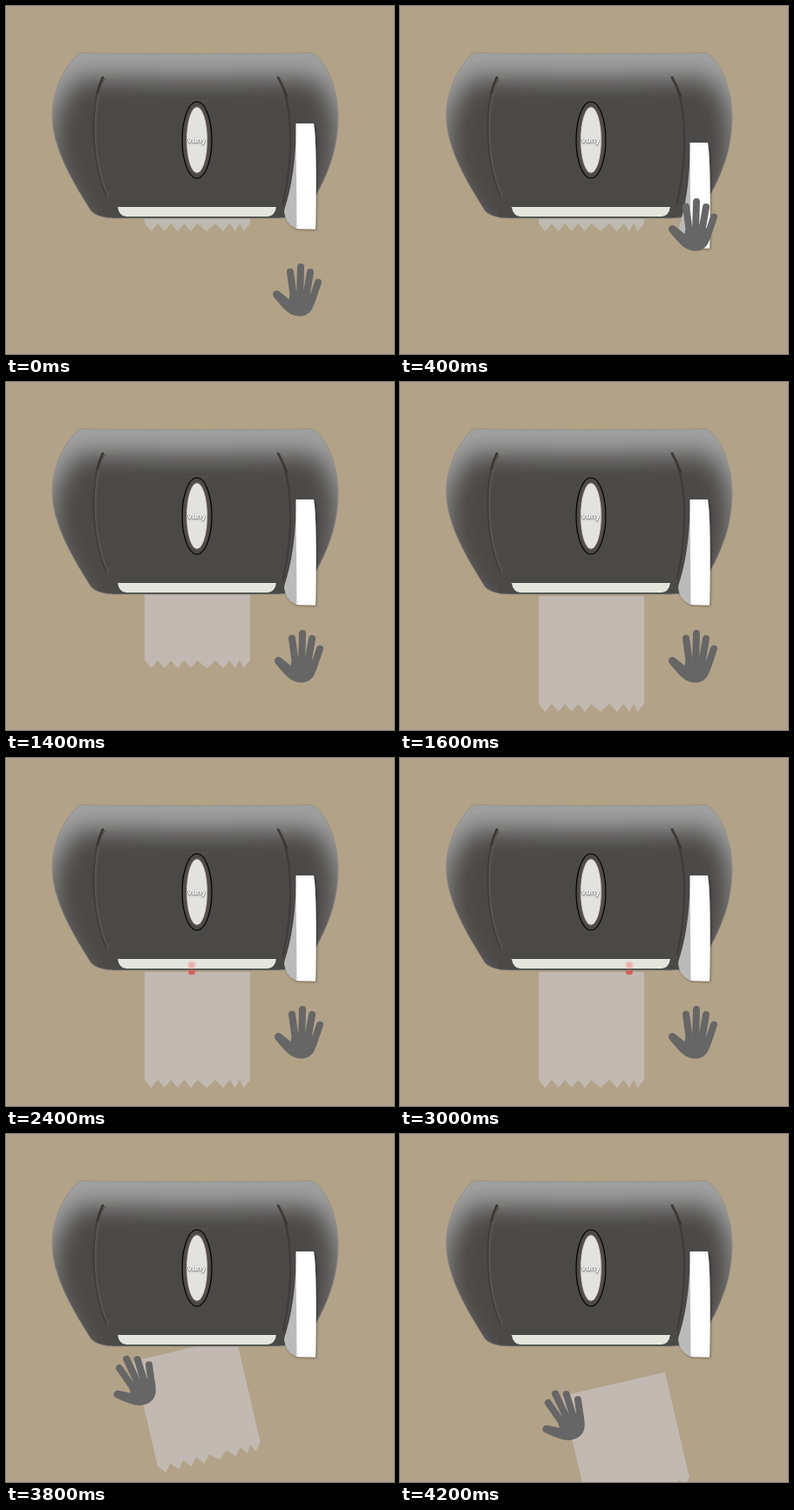
An HTML page for the animation above (4400 ms loop, 445x400 px).

```html
<!DOCTYPE html>
<html>
<head>
<meta charset="utf-8">
<style>
html, body { margin: 0; width: 100%; height: 100%; overflow: hidden; background: #b2a287; }
svg { display: block; }
text { font: bold 9px "Liberation Sans", Arial, sans-serif; }
</style>
</head>
<body>
<svg width="445" height="400" viewBox="0 0 445 400">
  <defs>
    <path id="shell" d="M84 54 Q217 56 350 54 Q355 55 359 60 C372 74 381 100 381 128 C381 165 369 198 345 235 Q335 243 311 244 H123 Q103 243 97 235 C78 204 53 165 53 126 C53 98 66 70 84 54Z"/>
    <clipPath id="inside"><use href="#shell"/></clipPath>
    <filter id="glow" x="-30%" y="-30%" width="160%" height="160%"><feGaussianBlur stdDeviation="14"/></filter>
    <filter id="blur" x="-50%" y="-50%" width="200%" height="200%"><feGaussianBlur stdDeviation="1.3"/></filter>
    <filter id="soft" x="-10%" y="-30%" width="120%" height="160%"><feGaussianBlur stdDeviation=".6"/></filter>
    <filter id="drop" x="-20%" y="-20%" width="150%" height="150%">
      <feDropShadow dx="1" dy="1" stdDeviation="1.5" flood-opacity=".4"/>
    </filter>
  </defs>

  <path id="paper"/>

  <g id="dispenser">
    <path d="M110 243.5 H325" stroke="#4c4a47" stroke-width="3" filter="url(#blur)"/>
    <g clip-path="url(#inside)">
      <use href="#shell" fill="#a2a2a2"/>
      <use href="#shell" y="28" fill="#4b4946" filter="url(#glow)"/>
      <rect x="112" y="215" width="210" height="30" fill="#4b4946"/>
    </g>
    <use href="#shell" fill="none" stroke="#8f8d8a" stroke-width=".8"/>
    <g fill="none" stroke-linecap="round" filter="url(#soft)">
      <path d="M113 84 C100 106 97 172 117 219" stroke="#595754" stroke-width="2"/>
      <path d="M111 82 C98 106 95 172 115 218" stroke="#403e3b" stroke-width="2"/>
      <path d="M111 82 Q107 90 105 100M312 82 Q318 92 322 104" stroke="#393734" stroke-width="2.6"/>
      <path d="M312 82 C328 110 331 165 318 226" stroke="#403a3b" stroke-width="2.2"/>
    </g>
    <ellipse cx="219" cy="154" rx="17" ry="44" fill="#4b4946" stroke="#000" stroke-width="1.2"/>
    <ellipse cx="219" cy="154" rx="13" ry="39" fill="#6b5855" filter="url(#blur)"/>
    <ellipse cx="219" cy="154" rx="11.8" ry="37.8" fill="#e2e2e0" filter="url(#soft)"/>
    <text x="218.5" y="157" text-anchor="middle" fill="#fff" style="text-shadow: 0 1px 2px #444">Vuny</text>
    <path d="M128 231 H310 Q308 242 300 242 H138 Q130 242 128 231Z" fill="#e4e5de" filter="url(#soft)"/>
  </g>

  <g id="dot">
    <circle cy="238" r="4" fill="#ee9d95" opacity=".75" filter="url(#blur)"/>
    <ellipse cy="246.5" rx="4" ry="2.7" fill="#d6605a"/>
  </g>

  <g id="lever" filter="url(#drop)">
    <path d="M333 137 C332 180 328 208 319 235 Q320 251 334 256Z" fill="#bababa"/>
    <path d="M332.5 135 H353 Q357 160 355 256.5 L333.5 256Z" fill="#fff"/>
  </g>

  <g id="hand" fill="#666" stroke="#666" stroke-width="8" stroke-linecap="round">
    <path d="M-10 -36.5 L-6 -7M2 -42 L1 -7M13 -36 L8 -7M22 -24.5 L14 -1"/>
    <path d="M-25.5 -10.5 L-10 2" stroke-width="9"/>
    <path d="M-10 -12 H13 L18 -4 C17 8 10 14.5 1 14.5 C-10 14.5 -16 8 -28.5 -7 L-12 -3Z" stroke="none"/>
  </g>
</svg>
<script>
const STEP = 200, STEPS = 22;
const PRESS = 1, REST = 5, CUT = 9, REACH = 17, GRAB = 18, TEAR = 19;
const el = id => document.getElementById(id);
const clamp = (v, low, high) => Math.max(low, Math.min(v, high));
const place = (id, x, y, turn = 0) =>
  el(id).setAttribute("transform", `translate(${x} ${y}) rotate(${turn})`);

// Sheet with a torn lower edge; the teeth bunch up towards the right end
function sheet(width, height, points) {
  let d = `M0 0V${height}`;
  for (let i = 1; i <= points; i++) {
    const bunch = 7 * Math.max(0, Math.sin((i - points / 2) * Math.PI / 7));
    const x = i === points ? width : width * i / points + bunch;
    d += `L${x} ${height + (i % 2 ? 9 : 0)}`;
  }
  return d + "V0Z";
}

function handPose(step, slide) {
  if (step >= GRAB) return [155.5 + Math.max(slide, -5), 297 + Math.max(slide, 0), -27];
  if (step >= REACH) return [236, 332];
  if (step >= REST) return [338, 331];
  if (step >= PRESS) return [338, step === PRESS + 1 ? 267 : 247];
  return [336, 342];
}

function paperPose(step, slide) {
  if (step >= TEAR) return [146 + slide, 261 + slide, -13];
  const n = clamp(step - REST, 0, 3);
  return [159, 126 + n * (25 + 5 * n)];   // feeds out faster and faster
}

function draw(time) {
  const step = Math.floor(time / STEP) % STEPS;
  const slide = 20 * (step - TEAR);
  place("hand", ...handPose(step, slide));
  place("paper", ...paperPose(step, slide));
  el("paper").setAttribute("fill", step > REST ? "#c2b9b2" : "#beb9b1");
  place("lever", 0, step === PRESS + 1 ? 22 : 0);

  // The cutter runs along the slot, slower at both ends
  const k = step - CUT;
  place("dot", Math.max(163, Math.min(153 + 20 * k, 203 + 10 * k)), 0);
  el("dot").style.display = step >= CUT && step < REACH ? "" : "none";
}

el("paper").setAttribute("d", sheet(121, 124, 16));
const start = performance.now();
function tick() {
  draw(performance.now() - start);
  requestAnimationFrame(tick);
}
tick();
</script>
</body>
</html>
```
